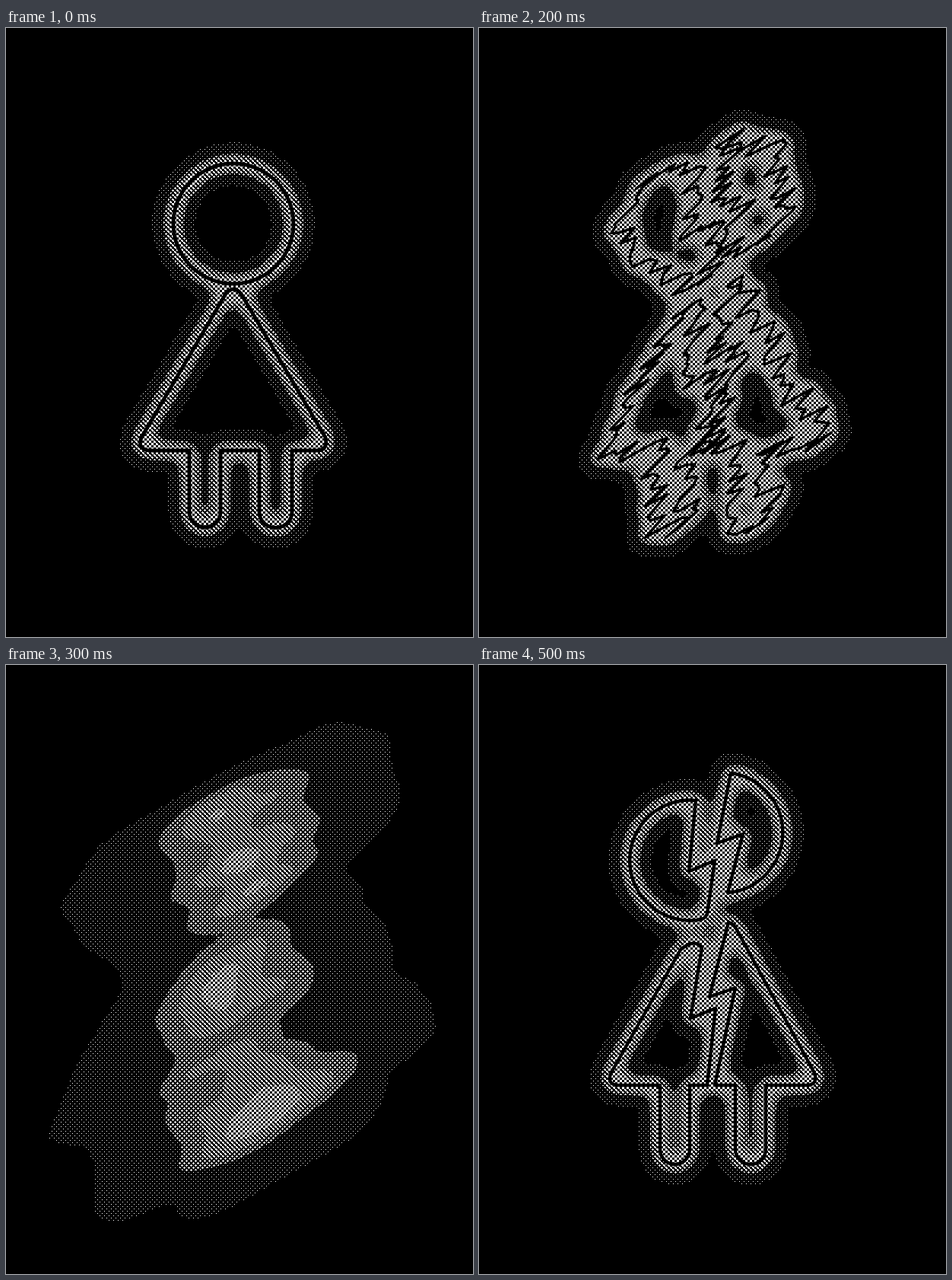
An HTML page with a canvas that plays this animation: 614 px wide and 800 px high, repeating every 0.6 s.

```html
<!DOCTYPE html>
<html>
<head>
<meta charset="utf-8">
<style>
html, body { margin: 0; height: 100%; background: #000; overflow: hidden; }
canvas { display: block; }
</style>
</head>
<body>
<canvas id="stage" width="614" height="800"></canvas>
<script>
const W = 614, H = 800;
const stage = document.getElementById('stage').getContext('2d');

const whole = [
  'M299 178 A79 79 0 1 1 298.9 178 Z',
  'M289 349 Q299 337 309 349 L420 538 Q424 555 408 555 H376 V636 A21 20 0 0 1 333 636' +
  ' V555 H282 V636 A20.5 20 0 0 1 241 636 V555 H188 Q172 553 178 538 Z'
];
const cracked = [
  'M285 178 L276 271 L310 257 L300 327 Q298 332 293 334 A79 79 0 1 1 285 178 Z',
  'M331 142 A79 79 0 0 1 327 299 L347 222 L313 234 Z',
  'M293 372 Q284 358 265 374 L173 537 Q168 552 184 552 H238 V636 A19.5 20 0 0 0 277 636' +
  ' V552 H300 L311 451 L278 464 Z',
  'M328 338 L303 436 L337 424 L310 552 H337 V636 A20 20 0 0 0 377 636 V552 H433' +
  ' Q446 550 441 536 L338 346 Q334 340 328 338 Z'
];

function layer() {
  const c = document.createElement('canvas');
  c.width = W;
  c.height = H;
  const g = c.getContext('2d', { willReadFrequently: true });
  g.lineJoin = g.lineCap = 'round';
  g.fillRect(0, 0, W, H);
  return g;
}

function seeded(seed) {
  return () => (seed = seed * 16807 % 2147483647) / 2147483647;
}

// Throws points of each contour back and forth along a rising diagonal.
function shred(contours) {
  const rand = seeded(4711);
  const path = document.createElementNS('http://www.w3.org/2000/svg', 'path');
  return contours.map(d => {
    path.setAttribute('d', d);
    const length = path.getTotalLength(), points = [];
    for (let s = 0; s < length; s += 4 + 6 * rand()) {
      const p = path.getPointAtLength(s);
      const k = 27 * (2 * rand() - 1) + 0.06 * (p.x - 305);
      points.push((p.x + 0.8 * k).toFixed(1) + ' ' + (p.y - 0.6 * k).toFixed(1));
    }
    return 'M' + points.join('L') + 'Z';
  });
}

function glow(path) {
  const g = layer();
  g.filter = 'blur(10px)';
  g.strokeStyle = 'rgb(143,143,143)';
  g.lineWidth = 26;
  g.stroke(path);
  g.filter = 'none';
  return g;
}

function outline(g, path, width) {
  g.strokeStyle = '#000';
  g.lineWidth = width;
  g.stroke(path);
}

// Repeatedly averages two opposite shifts, which adds up to a motion blur.
function smear(g, dx, dy) {
  for (let k = 0.5; k > 0.01; k /= 2) {
    const next = layer();
    next.drawImage(g.canvas, k * dx, k * dy);
    next.globalAlpha = 0.5;
    next.drawImage(g.canvas, -k * dx, -k * dy);
    g = next;
  }
  return g;
}

// Diagonal halftone screen: dots grow and join into falling lines.
function halftone(g) {
  const img = g.getImageData(0, 0, W, H), px = img.data;
  const wave = n => Math.cos(n * Math.PI / 3);
  for (let y = 0, i = 0; y < H; y++) {
    for (let x = 0; x < W; x++, i += 4) {
      const dot = (wave(x + y) + 1.25 * wave(x - y)) / 2.25;
      const limit = 0.03 + 0.97 * (1 - dot) / 2;
      px[i] = px[i + 1] = px[i + 2] = px[i] / 255 > limit ? 255 : 0;
    }
  }
  g.putImageData(img, 0, 0);
  return g;
}

function figure(path, width) {
  const g = halftone(glow(path));
  outline(g, path, width);
  return g.canvas;
}

const toPath = contours => new Path2D(contours.join(' '));
const shards = toPath(shred(cracked));
const poses = [
  figure(toPath(whole), 5),
  figure(toPath(cracked), 4.5),
  figure(shards, 3.5),
  halftone(smear(glow(shards), 108, -60)).canvas
];
const order = [0, 1, 2, 3, 2, 1];

const start = performance.now();
function tick() {
  const step = Math.floor((performance.now() - start) / 100);
  stage.drawImage(poses[order[step % order.length]], 0, 0);
  requestAnimationFrame(tick);
}
tick();
</script>
</body>
</html>
```
